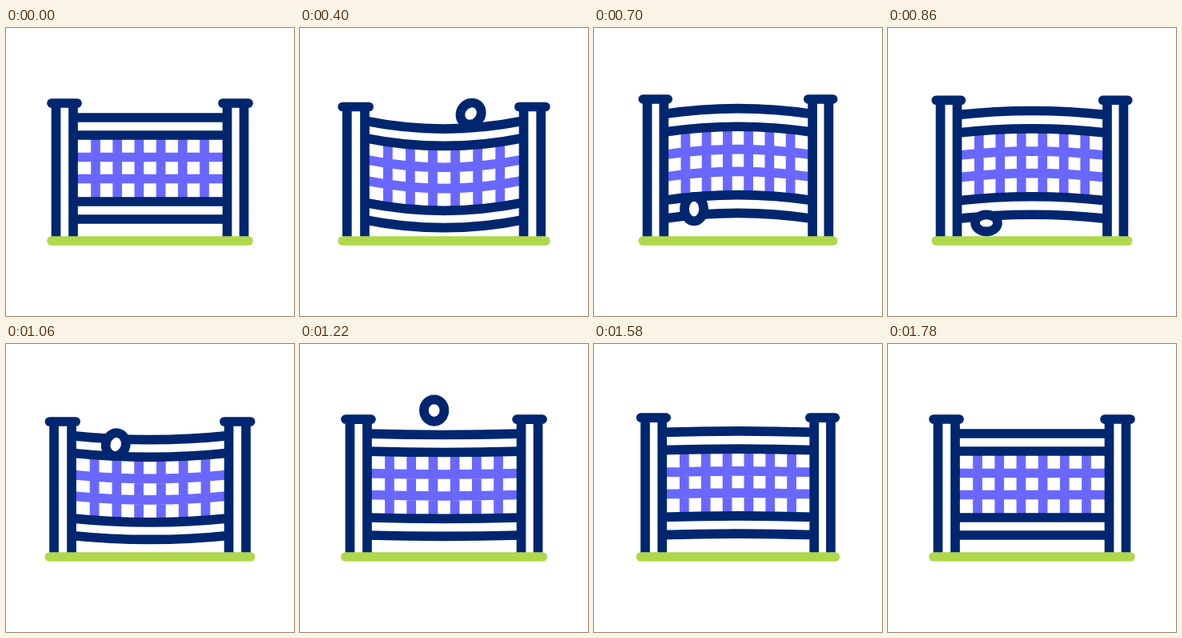
These frames come from a looping animation (360x360 px, 2.2 s). An HTML page:

```html
<!DOCTYPE html>
<html lang="en">
<head>
<meta charset="utf-8">
<title>Net and ball</title>
<style>
  html, body { margin: 0; width: 100%; height: 100%; overflow: hidden; background: #fff; }
  svg { display: block; width: 100vw; height: 100vh; }
  path, ellipse { fill: none; stroke-width: 11.7; }
  .navy { stroke: #00266f; }
  .mesh { stroke: #6a67ff; }
  .ground { stroke: #b0d84c; }
  .round { stroke-linecap: round; }
  #panel, #ball { fill: #fff; }
</style>
</head>
<body>
<svg id="stage" viewBox="0 0 360 360">
  <path id="panel"/>
  <path id="mesh" class="mesh"/>
  <path id="bars" class="navy"/>
  <path id="posts" class="navy"/>
  <path id="caps" class="navy round"/>
  <path id="ground" class="ground round"/>
  <ellipse id="ball" class="navy"/>
</svg>
<script>
const LOOP = 2200, STEP = 20, MID = 180, FLOOR = 266;
const $ = id => document.getElementById(id);
const stage = $('stage'), panel = $('panel'), ball = $('ball');

// Turning points of the swaying frame: time, squash of the posts, sag of the net.
const SWAY = [[200, 0, 0], [400, 4.5, 10], [765, -5.8, -8.3], [1060, 3, 5], [1400, -3.5, -2.8], [1780, 0, 0]];

function sway(t) {
  const i = SWAY.findIndex(key => t < key[0]);
  if (i < 1) return [0, 0];
  const [t0, ...a] = SWAY[i - 1], [t1, ...b] = SWAY[i];
  const k = (1 - Math.cos(Math.PI * (t - t0) / (t1 - t0))) / 2;
  return a.map((v, j) => v + (b[j] - v) * k);
}

// Two throws: over the net to the front, then back behind it.
const REST = 239;
const OVER = { peak: 530, top: 73, up: 287, down: 177, lean: 38 };
const RETURN = { peak: 1165, top: 67, up: 180, down: 180, lean: 15 };
const SHOW = 290, HIDE = 1320;
const LAND = OVER.peak + OVER.down, JUMP = RETURN.peak - RETURN.up;

function ballPose(t) {
  const x = 123 + 0.295 * Math.max(0, LAND - t) + 0.19 * Math.max(0, t - JUMP);
  if (t > LAND && t < JUMP) {
    const s = 2.4 - 4.9 * Math.sin(Math.PI * (t - LAND) / (JUMP - LAND));
    return { x, y: FLOOR - 11.6 - (13 + s), s, tilt: 0 };
  }
  const arc = t <= LAND ? OVER : RETURN;
  const u = (t - arc.peak) / (t < arc.peak ? arc.up : arc.down);
  return {
    x,
    y: arc.top + (REST - arc.top) * u * u,
    s: 2.4 * Math.abs(u),
    tilt: u < 0 ? arc.lean * Math.sin(-Math.PI * u) : 0
  };
}

function drawFrame(t) {
  const [squash, sag] = sway(t);
  const kx = 1 + squash * 0.007, ky = 1 - squash / 172;
  const X = x => MID + (x - MID) * kx;
  const Y = y => FLOOR - (FLOOR - y) * ky;
  const line = (x0, y0, x1, y1) => `M${X(x0)} ${Y(y0)}L${X(x1)} ${Y(y1)}`;
  const bent = y => `M${X(84)} ${Y(y)}Q${MID} ${Y(y) + 2 * sag} ${X(276)} ${Y(y)}`;
  const upright = x => {
    const u = (x - MID) / 96, dy = sag * (1 - u * u);
    return `M${X(x)} ${Y(134) + dy}L${X(x)} ${Y(217) + dy}`;
  };
  const set = (id, d) => $(id).setAttribute('d', d);

  let mesh = bent(161.5) + bent(188.5);
  for (let i = 0; i < 6; i++) mesh += upright(112 + i * 27.2);

  set('mesh', mesh);
  set('bars', [112, 134, 217, 239].map(bent).join(''));
  set('posts', [62.5, 84, 276.5, 297.5].map(x => line(x, 94, x, FLOOR)).join(''));
  set('caps', line(57, 94, 89, 94) + line(271, 94, 303, 94));
  set('ground', line(57, FLOOR, 303, FLOOR));
  set('panel', bent(112) + `V${FLOOR}H${X(84)}Z`);
}

function drawBall(t) {
  const seen = t >= SHOW && t <= HIDE;
  ball.style.display = seen ? '' : 'none';
  if (!seen) return;
  if (t > OVER.peak && t < RETURN.peak) stage.append(ball);
  else panel.before(ball);
  const { x, y, s, tilt } = ballPose(t);
  ball.setAttribute('rx', 13 - 0.4 * s);
  ball.setAttribute('ry', 13 + s);
  ball.setAttribute('transform', `translate(${x} ${y}) rotate(${tilt})`);
}

const start = performance.now();
function tick() {
  const t = Math.floor((performance.now() - start) % LOOP / STEP) * STEP;
  drawFrame(t);
  drawBall(t);
  requestAnimationFrame(tick);
}
tick();
</script>
</body>
</html>
```
